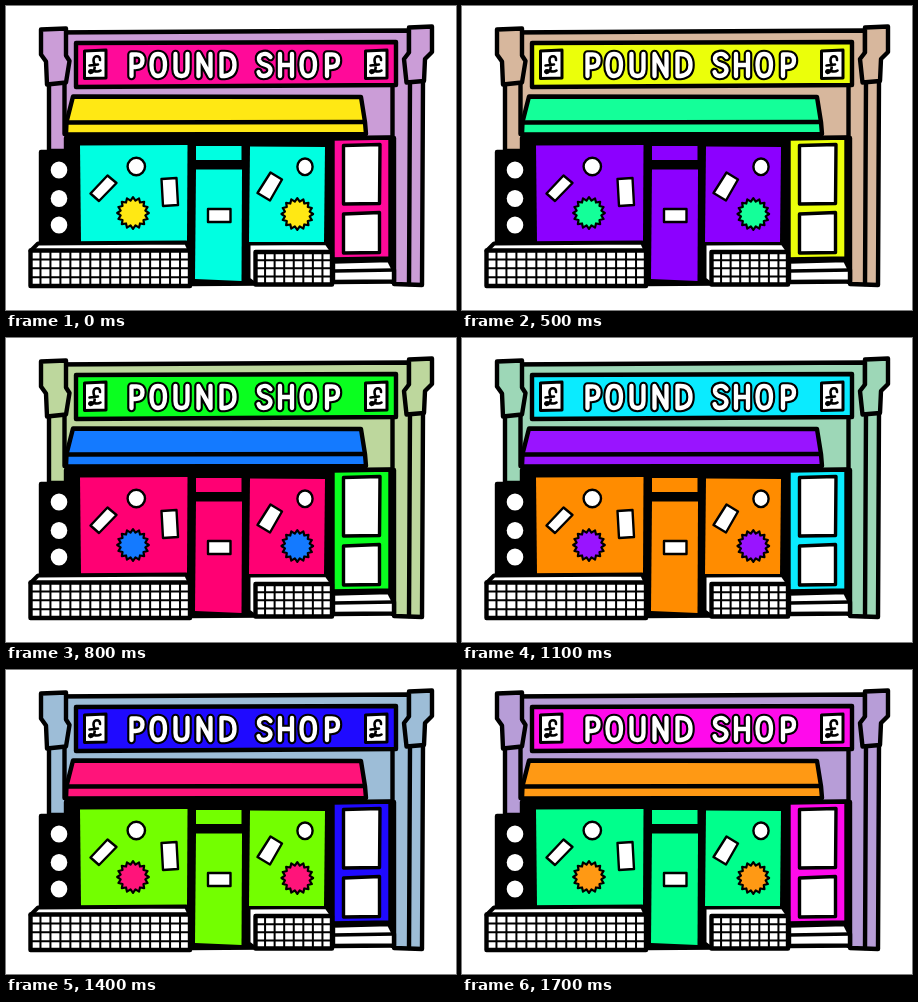
Write an HTML page with a canvas that moves like this. It is 450 by 304 pixels and loops after 1800 ms.

```html
<!DOCTYPE html>
<html lang="en">
<head>
<meta charset="utf-8">
<title>Pound Shop</title>
<style>
  html, body { margin: 0; width: 100%; height: 100%; overflow: hidden; background: #fff; }
  canvas { display: block; width: 450px; height: 304px; }
</style>
</head>
<body>
<canvas id="stage" width="450" height="304" role="img" aria-label="POUND SHOP"></canvas>
<script>
const ctx = document.getElementById('stage').getContext('2d');
const STEP_MS = 100, STEPS = 18;
const INK = '#000', WHITE = '#fff';

function paint(path, fill, width = 4.4) {
  const shape = typeof path === 'string' ? new Path2D(path) : path;
  if (fill) { ctx.fillStyle = fill; ctx.fill(shape); }
  if (width) { ctx.strokeStyle = INK; ctx.lineWidth = width; ctx.stroke(shape); }
}

function oval(x, y, rx, ry, fill, width) {
  const p = new Path2D();
  p.ellipse(x, y, rx, ry, 0, 0, Math.PI * 2);
  paint(p, fill, width);
}

function star(x, y, fill) {
  const p = new Path2D(), points = 16;
  for (let i = 0; i < points * 2; i++) {
    const r = i % 2 ? 12.6 : 15.8, a = i * Math.PI / points;
    p.lineTo(x + r * Math.cos(a), y + r * Math.sin(a));
  }
  p.closePath();
  paint(p, fill, 2.2);
}

// Tiled front face of a plinth
function tiles(left, right, top, bottom, cols) {
  paint(`M${left} ${top}H${right}V${bottom}H${left}Z`, WHITE);
  const p = new Path2D();
  for (let i = 1; i < cols; i++) {
    const x = left + (right - left) * i / cols;
    p.moveTo(x, top);
    p.lineTo(x, bottom);
  }
  for (let i = 1; i < 4; i++) {
    const y = top + (bottom - top) * i / 4;
    p.moveTo(left, y);
    p.lineTo(right, y);
  }
  paint(p, null, 2);
}

const LETTERS = {
  P: 'M3 24V2.5H7Q14 2 14 8.5Q14 15 7 15H3',
  O: 'M9 2C4 2 2.5 7 2.5 13C2.5 20 5 24 9 24C14 24 16 19 16 13C16 6 14 2 9 2Z',
  U: 'M2 2V17Q2 24 8 24Q14 24 14 17V2',
  N: 'M2 24V2L14 24V2',
  D: 'M2 2V24H5Q15 23 15 13Q15 2 5 2Z',
  S: 'M14 5Q11 1 7 2Q2 3 2.5 7.5Q3 11 8 12.5Q14 14 14 18.5Q13 24 7 24Q3 24 2 20',
  H: 'M2 2V24M14 2V24M2 13H14'
};
const LETTERING = [['P', 122.5], ['O', 143], ['U', 167.5], ['N', 190.5], ['D', 213.5],
                   ['S', 250.5], ['H', 272], ['O', 293], ['P', 318]];

function lettering() {
  for (const [char, x] of LETTERING) {
    const glyph = new Path2D(LETTERS[char]);
    ctx.save();
    ctx.translate(x, 46);
    for (const [color, width] of [[INK, 8.6], [WHITE, 4.3]]) {
      ctx.strokeStyle = color;
      ctx.lineWidth = width;
      ctx.stroke(glyph);
    }
    ctx.restore();
  }
}

function poundSign(x) {
  ctx.save();
  ctx.translate(x, 44);
  paint('M0 1L21.5 0V28L0 28.5Z', WHITE, 3);
  paint('M15.5 10C16 5 9 5 9 10C9 14 12 17 9 21C7 24 4 23 5 21C7 18 11 24 16 20.5M5 15.5L13.5 14.5', null, 2.6);
  ctx.restore();
}

function draw(step) {
  const turn = step * 360 / STEPS;
  const tint = (hue, sat, light) => `hsl(${(hue + turn) % 360} ${sat}% ${light}%)`;
  const stone = tint(287, 42, 73);
  const trim = tint(325, 100, 52);
  const awning = tint(54, 100, 54);
  const glass = tint(173, 100, 50);

  ctx.fillStyle = WHITE;
  ctx.fillRect(0, 0, 450, 304);
  ctx.lineJoin = ctx.lineCap = 'round';

  // Stonework
  paint('M43 26.5L403 24.5V74H417L416 279L388 278V132H60V145H43Z', stone);
  paint('M58.5 77V128M386.5 80V276M404 75L403 278');
  paint('M35 23.5L60 22.5V49.5L63.5 55L60 76.5L41 78.5L40 55.5L35 48.5Z', stone);
  paint('M403 21.5L426 20.5V46L419 53L418 75L400.5 76.5L398 53L403 46.5Z', stone);

  // Fascia
  paint('M70 37L390 36V79L70 81Z', trim);
  poundSign(78.5);
  poundSign(359.5);
  lettering();

  // Shop front
  paint('M61 129H326V277L184 278V236H35V146H61Z', INK);
  for (const y of [164, 192.5, 219]) oval(53, y, 8.3, 8.6, WHITE, 0);
  paint('M74 139.5L181.5 139L181 235L75 236Z', glass, 0);
  paint('M190 140H235.5V154H190Z', glass, 0);
  paint('M190 163.5H236L235.5 275L189 273Z', glass, 0);
  paint('M244 140.5L319 141L318 236H243Z', glass, 0);

  // Awning
  paint('M67 90.5L355 91L359 116L360 128L60 128.5L60.5 116Z', awning);
  paint('M61 116.5L358 116');

  // Window displays
  oval(130.3, 160.5, 8.7, 8.7, WHITE, 2.4);
  paint('M84.5 187.5L101.5 169.5L110.5 177L93 195Z', WHITE, 2.4);
  paint('M155.5 173L170.5 172L172 199L157 200Z', WHITE, 2.4);
  star(127, 207, awning);
  oval(299, 160.8, 7.6, 8.3, WHITE, 2.4);
  paint('M251.5 187L264.5 166.5L276 173.5L264 194.5Z', WHITE, 2.4);
  star(291.3, 208, awning);
  paint('M202 203H224.5V216H202Z', WHITE, 2.4);

  // Side door and steps
  paint('M326.5 132.5L384.5 131.5V252.5L326.5 253.5Z', trim);
  paint('M337.5 139.5L374 138.5L373.5 197.5L337.5 198Z', WHITE, 3.4);
  paint('M337.5 208L373.5 206.5V246.5L337.5 247Z', WHITE, 3.4);
  paint('M327 255.5L383 254L388 264V275.5L327 276Z', WHITE);
  paint('M328 265L388 264', null, 3.4);

  // Plinths
  paint('M32 237.5L180 236.5L184 245H24.5Z', WHITE, 4);
  tiles(24.5, 184, 244.5, 280, 16);
  paint('M243 238L320 237.5L326 246H249.5V278L243 273Z', WHITE, 3);
  tiles(249.5, 326, 246, 278.5, 8);
}

function tick() {
  draw(Math.floor(performance.now() / STEP_MS) % STEPS);
  requestAnimationFrame(tick);
}
tick();
</script>
</body>
</html>
```
